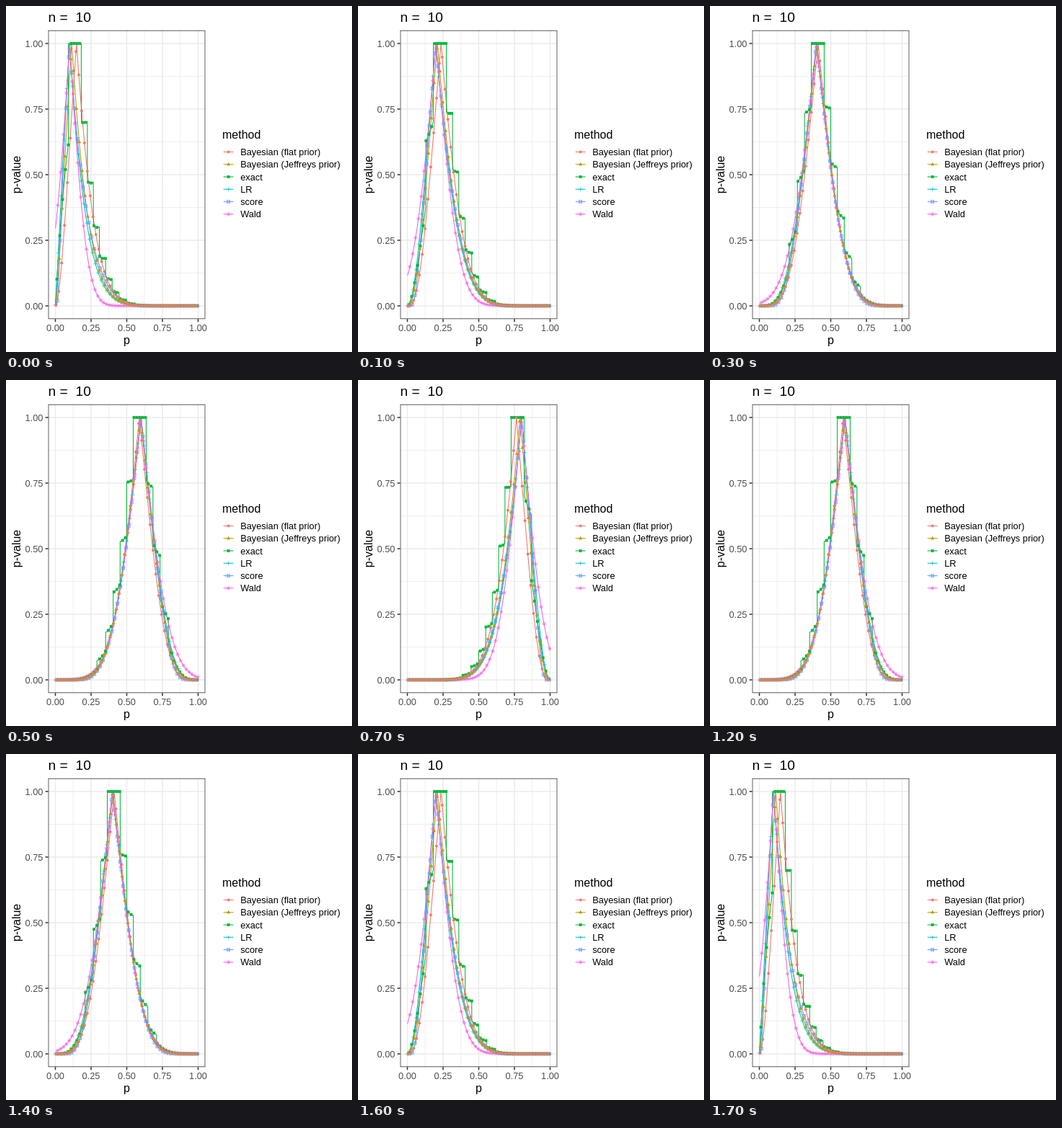
Recreate the animation shown at these times as an HTML page with a canvas. Size 480x480 px, loop 1800 ms.

```html
<!DOCTYPE html>
<html lang="en">
<head>
<meta charset="utf-8">
<title>p-value functions</title>
<style>
html, body { margin: 0; width: 100%; height: 100%; overflow: hidden; background: #fff; }
canvas { display: block; }
</style>
</head>
<body>
<canvas id="stage" width="480" height="480"></canvas>
<script>
const ctx = document.getElementById('stage').getContext('2d');
const n = 10, N = 1500, STEP = 30, R = 1.95;
const L = 58.6, T = 33.8, W = 217.8, H = 400.4;
const px = p => 68.5 + 198 * p, py = v => 416 - 364 * v;

// two-sided tail probability of a standard normal
function twoTail(z) {
  const a = Math.abs(z) / Math.SQRT2, t = 1 / (1 + 0.3275911 * a);
  return t * (0.254829592 + t * (-0.284496736 + t * (1.421413741 +
    t * (-1.453152027 + t * 1.061405429)))) * Math.exp(-a * a);
}

// turn a p-value function into samples at i / N, 0 < i < N
const sample = f => Array.from({ length: N }, (_, i) => i ? f(i / N) : 0);

// doubled smaller tail of a Beta(a, b) posterior
function bayes(a, b) {
  const cdf = [0];
  for (let i = 1; i <= N; i++) {
    const p = (i - 0.5) / N;
    cdf[i] = cdf[i - 1] + p ** (a - 1) * (1 - p) ** (b - 1);
  }
  return cdf.map(c => 2 * Math.min(c, cdf[N] - c) / cdf[N]);
}

const choose = [1];
for (let k = 1; k <= n; k++) choose[k] = choose[k - 1] * (n - k + 1) / k;

function exact(x, p) {
  const d = choose.map((c, k) => c * p ** k * (1 - p) ** (n - k));
  return Math.min(1, d.reduce((s, v) => v <= d[x] * (1 + 1e-7) ? s + v : s, 0));
}

function likelihoodRatio(x, p) {
  const q = x / n;
  const g = 2 * (x * Math.log(q / p) + (n - x) * Math.log((1 - q) / (1 - p)));
  return twoTail(Math.sqrt(Math.max(0, g)));
}

const normalTest = (x, p, v) => twoTail((x / n - p) / Math.sqrt(v * (1 - v) / n));

function seg(...pts) {
  for (let i = 0; i < pts.length; i += 4) {
    ctx.moveTo(pts[i], pts[i + 1]);
    ctx.lineTo(pts[i + 2], pts[i + 3]);
  }
}
const cross = (x, y, r) => seg(x - r, y - r, x + r, y + r, x - r, y + r, x + r, y - r);
const plus = (x, y, r) => seg(x - r, y, x + r, y, x, y - r, x, y + r);
const box = (x, y) => ctx.rect(x - R, y - R, 2 * R, 2 * R);

function triangle(x, y) {
  ctx.moveTo(x, y - 1.555 * R);
  ctx.lineTo(x + 1.347 * R, y + 0.778 * R);
  ctx.lineTo(x - 1.347 * R, y + 0.778 * R);
  ctx.closePath();
}

// first: index of the first marker
const methods = [
  { name: 'Bayesian (flat prior)', color: '#F8766D', first: 6, solid: true,
    curve: x => bayes(x + 1, n - x + 1),
    mark: (x, y) => ctx.arc(x, y, R, 0, 7) },
  { name: 'Bayesian (Jeffreys prior)', color: '#B79F00', first: 11, solid: true,
    curve: x => bayes(x + 0.5, n - x + 0.5),
    mark: triangle },
  { name: 'exact', color: '#00BA38', first: 16, solid: true,
    curve: x => sample(p => exact(x, p)),
    mark: box },
  { name: 'LR', color: '#00BFC4', first: 1,
    curve: x => sample(p => likelihoodRatio(x, p)),
    mark: (x, y) => plus(x, y, R * Math.SQRT2) },
  { name: 'score', color: '#619CFF', first: 21,
    curve: x => sample(p => normalTest(x, p, p)),
    mark: (x, y) => { box(x, y); cross(x, y, R); } },
  { name: 'Wald', color: '#F564E3', first: 26,
    curve: x => sample(p => normalTest(x, p, x / n)),
    mark: (x, y) => { cross(x, y, R); plus(x, y, R * Math.SQRT2); } }
];
const markOrder = [3, 5, 4, 2, 1, 0];

function drawMark(m, x, y) {
  ctx.beginPath();
  m.mark(x, y);
  if (m.solid) {
    ctx.fillStyle = m.color;
    ctx.fill();
  } else {
    ctx.strokeStyle = m.color;
    ctx.lineWidth = 0.71;
    ctx.stroke();
  }
}

function line(color, width, ...pts) {
  ctx.beginPath();
  seg(...pts);
  ctx.strokeStyle = color;
  ctx.lineWidth = width;
  ctx.stroke();
}

function text(s, x, y, size, align = 'left', color = '#000') {
  ctx.font = size + 'px "Liberation Sans", Arial, sans-serif';
  ctx.textAlign = align;
  ctx.fillStyle = color;
  ctx.fillText(s, x, y);
}

function drawGrid() {
  for (const [from, width] of [[0.125, 0.78], [0, 1.55]])
    for (let v = from; v <= 1; v += 0.25)
      line('#EBEBEB', width, L, py(v), L + W, py(v), px(v), T, px(v), T + H);
}

function drawAxes() {
  ctx.save();
  ctx.beginPath();
  ctx.rect(L, T, W, H);
  ctx.clip();
  ctx.strokeStyle = '#333';
  ctx.lineWidth = 1.55;
  ctx.strokeRect(L, T, W, H);
  ctx.restore();
  for (let v = 0; v <= 1; v += 0.25) {
    line('#333', 1.55, L - 4, py(v), L, py(v), px(v), T + H, px(v), T + H + 4);
    text(v.toFixed(2), L - 7.2, py(v) + 4.6, 12.8, 'right', '#4D4D4D');
    text(v.toFixed(2), px(v), 450.6, 12.8, 'center', '#4D4D4D');
  }
  text('n =  10', L, 21.8, 19.2);
  text('p', 167.5, 468.6, 16, 'center');
  ctx.save();
  ctx.translate(19.5, 234);
  ctx.rotate(-Math.PI / 2);
  text('p-value', 0, 0, 16, 'center');
  ctx.restore();
}

function drawLegend() {
  text('method', 300, 184, 16);
  methods.forEach((m, i) => {
    const y = 202.4 + 17.28 * i;
    line(m.color, 1.07, 301.7, y, 315.6, y);
    drawMark(m, 308.6, y);
    text(m.name, 325.2, y + 4.6, 12.8);
  });
}

function drawCurves(x) {
  const curves = methods.map(m => m.curve(x));
  ctx.lineJoin = 'round';
  methods.forEach((m, k) => {
    ctx.beginPath();
    for (let i = 1; i < N; i++) ctx.lineTo(px(i / N), py(curves[k][i]));
    ctx.strokeStyle = m.color;
    ctx.lineWidth = 1.07;
    ctx.stroke();
  });
  ctx.lineJoin = 'miter';
  for (const k of markOrder)
    for (let i = methods[k].first; i < N; i += STEP)
      drawMark(methods[k], px(i / N), py(curves[k][i]));
}

let shown = 0;
function frame(now) {
  const i = Math.floor(now / 100) % 18;
  const x = i < 9 ? i + 1 : 18 - i;
  if (x !== shown) {
    shown = x;
    ctx.fillStyle = '#fff';
    ctx.fillRect(0, 0, 480, 480);
    drawGrid();
    drawCurves(x);
    drawAxes();
    drawLegend();
  }
  requestAnimationFrame(frame);
}
frame(0);
</script>
</body>
</html>
```
